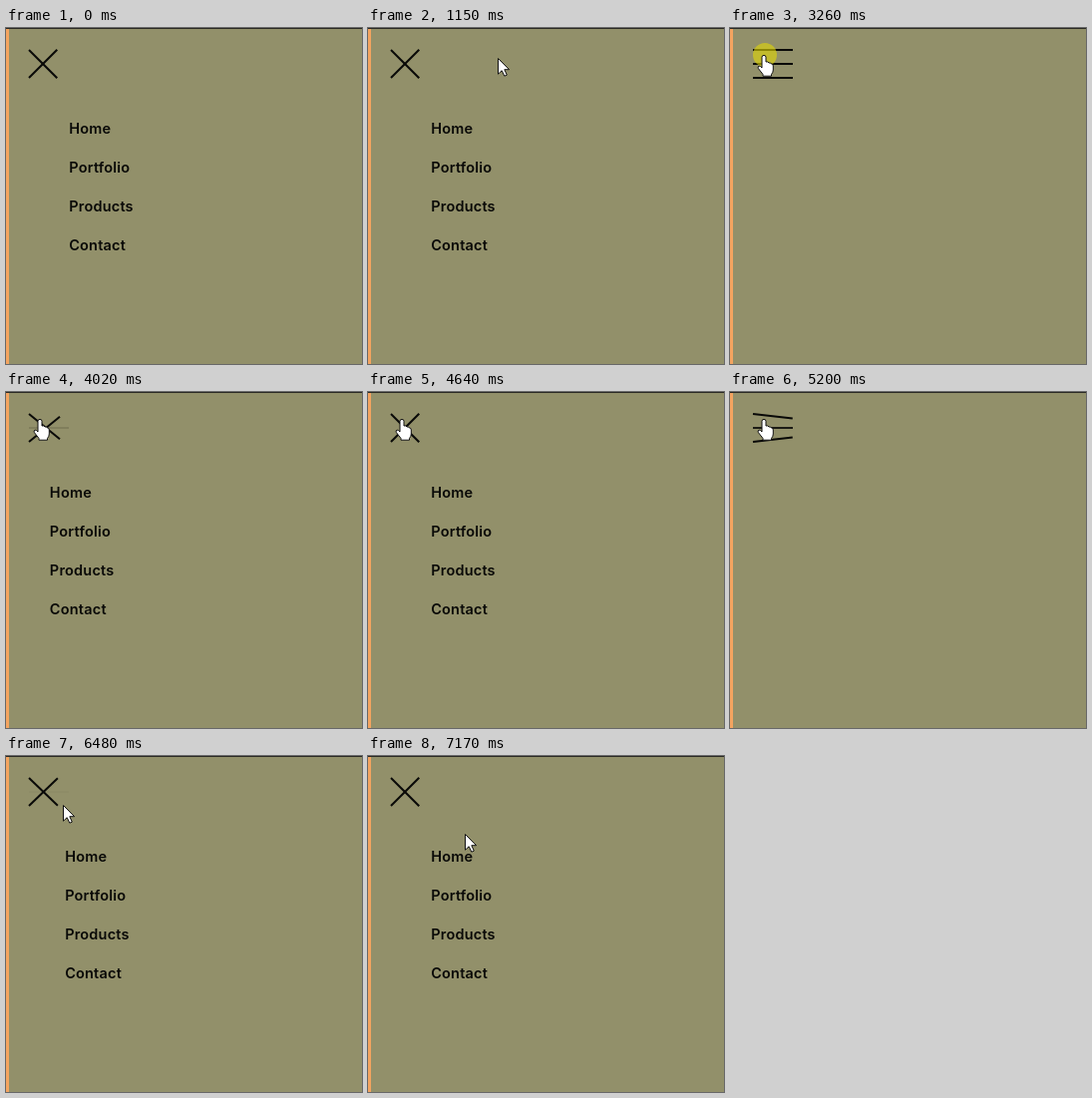
Write an HTML page with a canvas that moves like this. It is 357 px wide and 337 px high and loops after 8 s.

```html
<!DOCTYPE html>
<html lang="en">
<head>
<meta charset="utf-8">
<title>Menu toggle</title>
<style>
html, body { margin: 0; width: 100%; height: 100%; overflow: hidden; background: #92906a; }
canvas { display: block; }
</style>
</head>
<body>
<canvas id="stage" width="357" height="337"></canvas>
<script>
const ctx = document.getElementById('stage').getContext('2d');
const LOOP = 8000, STEP = 70, SLIDE = 150, DURATION = 1000;
const ITEMS = ['Home', 'Portfolio', 'Products', 'Contact'];
const ICON = { x: 23, y: 22, width: 40, gap: 14 };
const INK = '#090907', PANEL = '#92906a';

// Each click toggles the menu on release.
const CLICKS = [
  { press: 1690, release: 1870 },
  { press: 3230, release: 3420 },
  { press: 4490, release: 4630 },
  { press: 5520, release: 5660 }
];
const HOVER = { from: 1480, to: 6430 };

const ARROW = new Path2D('M.5 .5V16.2L4.2 12.7L6.8 18.2L9.3 17.1L6.8 11.7H11.6Z');
const HAND = new Path2D('M-2 1.2Q-2 -.6 0 -.6Q2 -.6 2 1.2V6Q4.2 5.2 5 7Q6.8 6.4 7.4 8Q9.3 7.8 9.3 10V14' +
  'Q9.3 16.5 7.5 18.5V20.2H-1V18.5L-5.6 12.6Q-6.6 10.6 -5 10.1Q-3.6 9.8 -2 12Z');

const snap = t => Math.max(0, Math.floor((t - 10) / STEP) * STEP + 10);
const clamp = v => Math.min(1, Math.max(0, v));
const mix = (a, b, f) => a + (b - a) * f;
const bezier = (a, b, c, d, u) =>
  a * (1 - u) ** 3 + 3 * b * u * (1 - u) ** 2 + 3 * c * u * u * (1 - u) + d * u ** 3;

// CSS "ease": cubic-bezier(.25, .1, .25, 1)
function ease(x) {
  let lo = 0, hi = 1;
  for (let i = 0; i < 24; i++) {
    const mid = (lo + hi) / 2;
    if (bezier(0, .25, .25, 1, mid) < x) lo = mid; else hi = mid;
  }
  return bezier(0, .1, 1, 1, lo);
}

function openness(t) {
  const done = CLICKS.filter(c => c.release <= t);
  if (!done.length) return 1;
  const p = ease(clamp((t - done[done.length - 1].release) / DURATION));
  return done.length % 2 ? 1 - p : p;
}

function pointerAt(t) {
  if (t < 260) return [-30, 30];
  if (t < 730) {
    // quick swing in from the left edge and out again
    const swing = t < 460 ? Math.sin(Math.PI * (t - 235) / 210) : -1;
    return [mix(-12, 185, swing), mix(24, 220, swing)];
  }
  if (t < 6400) {
    const u = clamp((t - 730) / 830);
    return [bezier(0, 255, 75, 34, u), bezier(8, -6, 78, 28, u)];
  }
  const away = clamp((t - 6400) / 350), back = clamp((t - 6780) / 380);
  return [mix(mix(34, 193, away), 94, back), mix(mix(28, 174, away), 75, back)];
}

function rect(color, x, y, w, h) {
  ctx.fillStyle = color;
  ctx.fillRect(x, y, w, h);
}

function bar(row, angle, height = 2) {
  ctx.save();
  ctx.translate(ICON.x, ICON.y + row * ICON.gap);
  ctx.rotate(angle);
  rect(INK, 0, -height / 2, ICON.width, height);
  ctx.restore();
}

function drawMenu(open) {
  ctx.fillStyle = INK;
  ctx.font = '600 14.5px Inter, sans-serif';
  ctx.letterSpacing = '0.2px';
  ITEMS.forEach((label, i) => ctx.fillText(label, 63.2 - SLIDE * (1 - open), 106 + 39 * i));

  const angle = open * Math.PI / 4;
  bar(0, angle);
  bar(1, 0, 2 * (1 - open));
  bar(2, -angle);
}

function drawEdges() {
  rect('#f4a460', 0, 0, 3, 337);
  rect('#2c2b25', 0, 0, 357, 1);
}

function drawPointer(t) {
  if (CLICKS.some(c => t >= c.press && t < c.release)) {
    ctx.fillStyle = 'rgba(226,217,5,.6)';
    ctx.beginPath();
    ctx.arc(35, 27, 12, 0, Math.PI * 2);
    ctx.fill();
  }
  const shape = t >= HOVER.from && t < HOVER.to ? HAND : ARROW;
  const [x, y] = pointerAt(t);
  ctx.save();
  ctx.translate(Math.round(x), Math.round(y));
  ctx.fillStyle = '#fff';
  ctx.strokeStyle = '#111';
  ctx.lineWidth = 1;
  ctx.lineJoin = 'round';
  ctx.fill(shape);
  ctx.stroke(shape);
  ctx.restore();
}

function draw(now) {
  const t = snap(now % LOOP);
  rect(PANEL, 0, 0, 357, 337);
  drawMenu(openness(t));
  drawEdges();
  drawPointer(t);
  requestAnimationFrame(draw);
}
requestAnimationFrame(draw);
</script>
</body>
</html>
```
